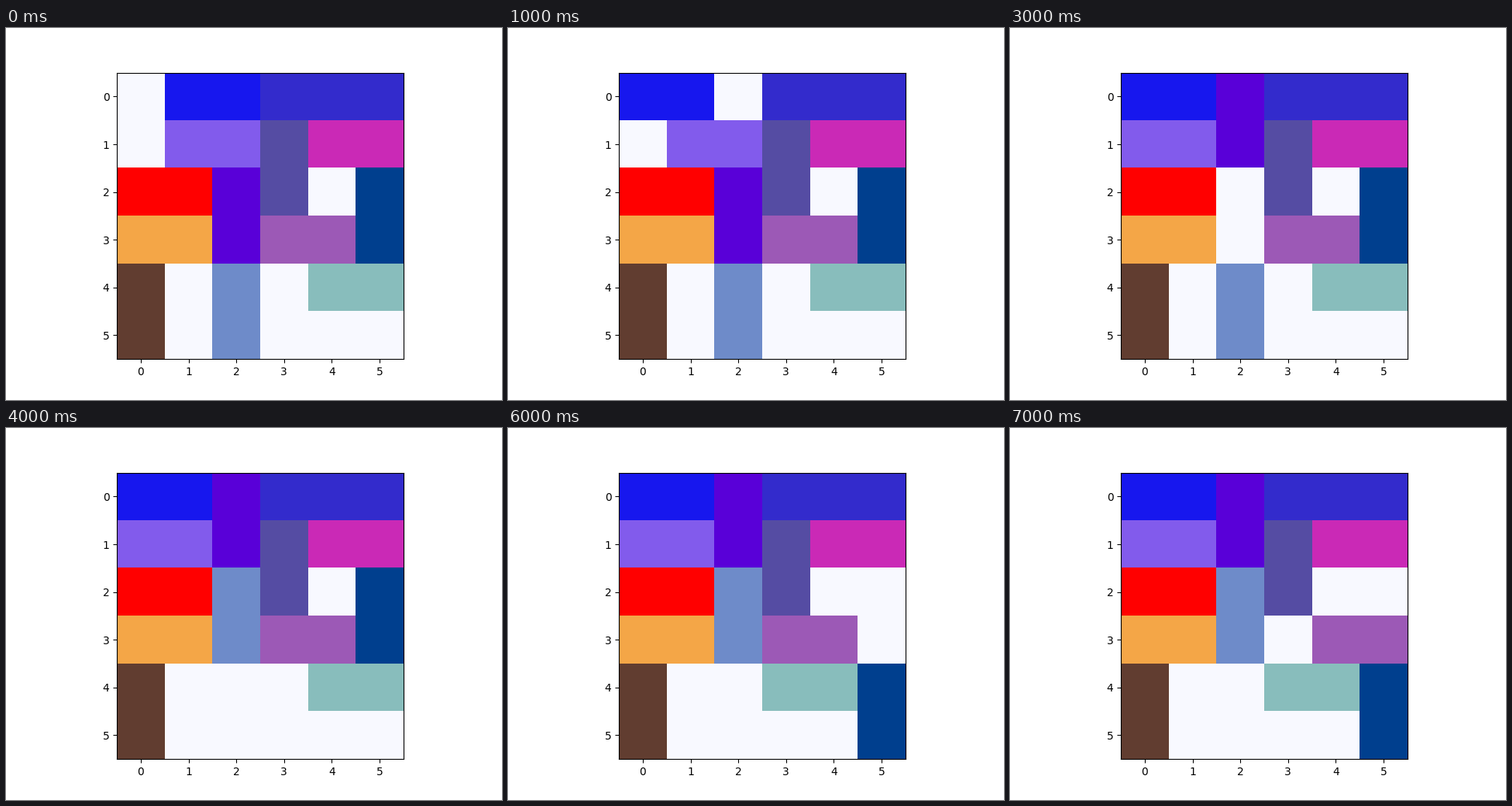
These frames come from a looping animation (640 by 480 pixels, 8 s). A matplotlib script:

```python
import matplotlib.pyplot as plt
import numpy as np
from matplotlib.animation import FuncAnimation
from matplotlib.colors import to_rgb

SIZE = 6
EMPTY = "#f8f9ff"

# name: (row, column, height, width, colour)
BLOCKS = {
    "blue": (0, 1, 1, 2, "#1717ee"),
    "indigo": (0, 3, 1, 3, "#332bcc"),
    "lilac": (1, 1, 1, 2, "#825bec"),
    "slate": (1, 3, 2, 1, "#554ca3"),
    "magenta": (1, 4, 1, 2, "#ca29b6"),
    "red": (2, 0, 1, 2, "#ff0000"),
    "violet": (2, 2, 2, 1, "#5900d8"),
    "navy": (2, 5, 2, 1, "#003f8e"),
    "orange": (3, 0, 1, 2, "#f4a647"),
    "plum": (3, 3, 1, 2, "#9c59b6"),
    "brown": (4, 0, 2, 1, "#613d30"),
    "steel": (4, 2, 2, 1, "#6e8bc9"),
    "teal": (4, 4, 1, 2, "#88bdbc"),
}

# One slide per step: name, rows down, columns right
MOVES = [
    ("blue", 0, -1),
    ("lilac", 0, -1),
    ("violet", -2, 0),
    ("steel", -2, 0),
    ("teal", 0, -1),
    ("navy", 2, 0),
    ("plum", 0, 1),
]


def rgb(colour):
    return [round(255 * c) for c in to_rgb(colour)]


def board(step):
    """Colour grid after the first `step` slides."""
    grid = np.empty((SIZE, SIZE, 3), dtype=np.uint8)
    grid[:] = rgb(EMPTY)
    for name, (row, col, height, width, colour) in BLOCKS.items():
        for moved, down, right in MOVES[:step]:
            if moved == name:
                row += down
                col += right
        grid[row:row + height, col:col + width] = rgb(colour)
    return grid


fig, ax = plt.subplots(figsize=(6.4, 4.8), dpi=100)
image = ax.imshow(board(0))
ax.set_xticks(range(SIZE))
ax.set_yticks(range(SIZE))


def update(step):
    image.set_data(board(step))
    return [image]


anim = FuncAnimation(fig, update, frames=len(MOVES) + 1, interval=1000,
                     repeat=True, repeat_delay=0)
plt.show()
```
